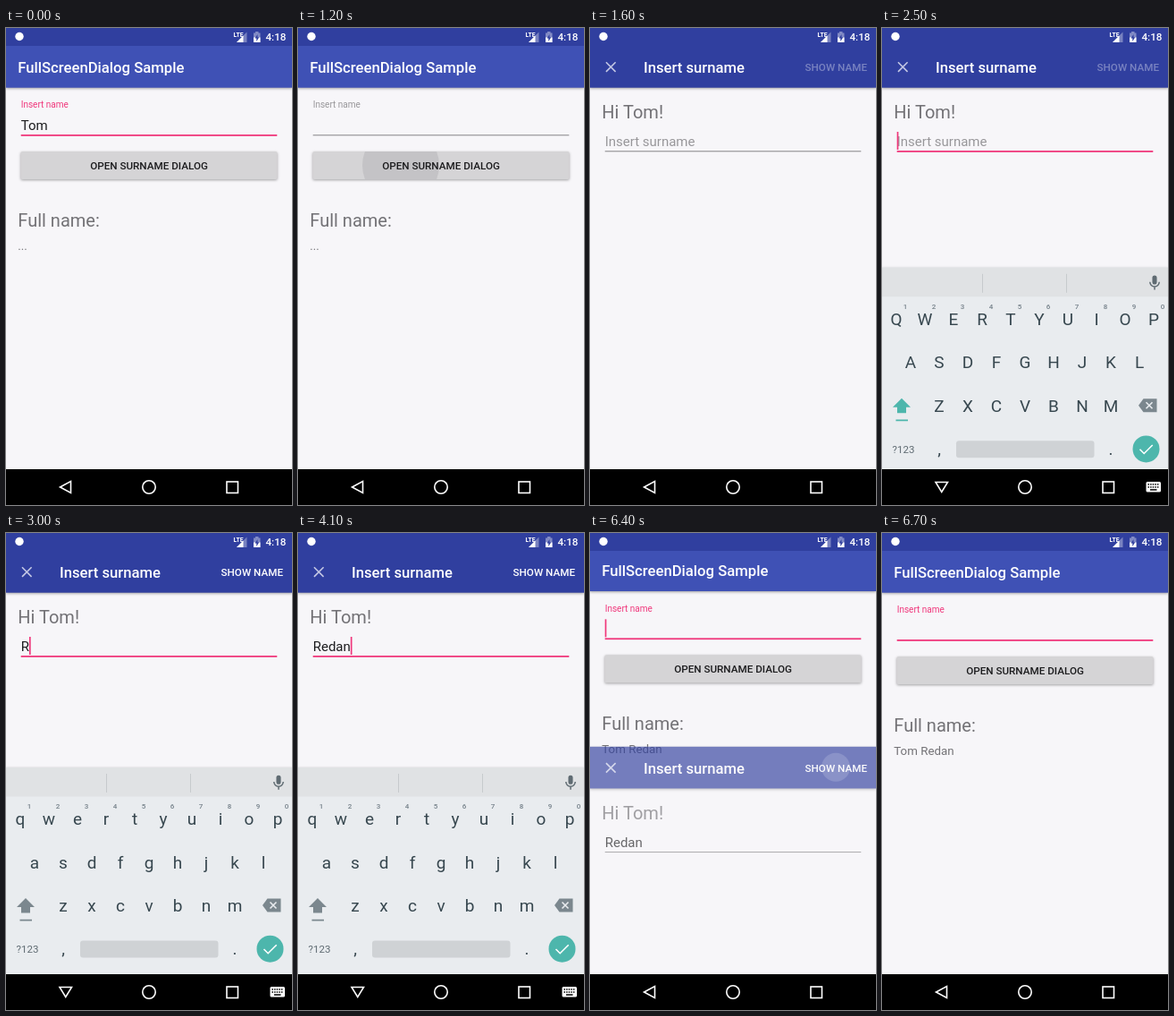
Write an HTML page that moves like this. It is 320 px wide and 533 px high and loops after 6.8 s.

```html
<!DOCTYPE html>
<html lang="en">
<head>
<meta charset="utf-8">
<title>FullScreenDialog Sample</title>
<style>
  html, body { margin: 0; height: 100%; overflow: hidden; background: #f7f6f9; }
  svg { display: block; width: 100%; height: 100%; font: 15px Roboto, sans-serif; }
  .title { font-size: 16.67px; font-weight: 500; fill: #fff; }
  .caps { font-size: 11.67px; font-weight: 500; }
  .head { font-size: 20px; fill: #737276; }
  .body { font-size: 13.33px; fill: #737276; }
  .label { font-size: 10px; }
  .field { fill: #1d1d1f; }
  .shadow { filter: drop-shadow(0 1px 1.5px rgba(0, 0, 0, .35)); }
  .line { fill: none; stroke-width: 1.6; }
  .key { font-size: 19px; fill: #37474f; text-anchor: middle; }
  .num { font-size: 8px; font-weight: 500; fill: #75818a; text-anchor: middle; }
</style>
</head>
<body>
<svg viewBox="0 0 320 533">
  <clipPath id="btnClip"><rect x="16.5" y="138" width="287" height="31" rx="1.7"/></clipPath>
  <rect width="320" height="533" fill="#f7f6f9"/>

  <g id="main">
    <rect class="shadow" y="10" width="320" height="56.7" fill="#3f51b5"/>
    <text class="title" x="13.3" y="50">FullScreenDialog Sample</text>
    <text class="label" id="nameLabel" x="16.7" y="89.3">Insert name</text>
    <text class="field" id="name" x="16.7" y="114"></text>
    <rect id="nameLine" x="16.7" width="286.6"/>
    <rect id="nameCaret" y="98" width="1.7" height="20" fill="#f0387c"/>
    <rect class="shadow" x="16.5" y="138" width="287" height="31" rx="1.7" fill="#d5d4d6"/>
    <circle id="btnRipple" cx="115" cy="153.5" fill="#c4c3c6" clip-path="url(#btnClip)"/>
    <text class="caps" x="160" y="158" text-anchor="middle" fill="#1c1c1e">OPEN SURNAME DIALOG</text>
    <text class="head" x="13.3" y="221.5">Full name:</text>
    <text class="body" id="full" x="13.3" y="248"></text>
  </g>

  <g id="dialog">
    <rect y="20" width="320" height="513" fill="#f7f6f9"/>
    <rect class="shadow" y="20" width="320" height="46.7" fill="#303f9f"/>
    <path class="line" stroke="#c3c7e4" d="M18 38.3l10.6 10.6M28.6 38.3l-10.6 10.6"/>
    <text class="title" x="60" y="50">Insert surname</text>
    <circle id="actRipple" cx="275" cy="43" fill="#fff" opacity=".16"/>
    <text class="caps" id="action" x="310" y="48" text-anchor="end" fill="#fff">SHOW NAME</text>
    <text class="head" id="hi" x="13.3" y="101"></text>
    <text id="surname" x="16.7" y="132"></text>
    <rect id="surLine" x="16.7" width="286.6"/>
    <rect id="surCaret" y="116" width="1.7" height="20" fill="#f0387c"/>
  </g>

  <g id="keyboard">
    <rect class="shadow" y="262" width="320" height="300" fill="#e9ecef"/>
    <rect y="262" width="320" height="32.5" fill="#e0e2e4"/>
    <path stroke="#c6cacd" d="M112.5 269v21M206.5 269v21"/>
    <g fill="none" stroke="#5f6b72" stroke-width="1.5">
      <path d="M299.8 278a5.2 5.2 0 0 0 10.4 0M305 283.3v3.4"/>
      <rect x="303.2" y="271.5" width="3.6" height="8.5" rx="1.8" fill="#5f6b72"/>
    </g>
    <g id="keys"></g>
    <path id="shift" d="M22 408l10 10h-5v6.5h-10v-6.5h-5zM15.5 431.7h13.5v1.8h-13.5z"/>
    <path fill="#7b878e" d="M287 416l5.5-7.5h15v15h-15z"/>
    <path stroke="#e9ecef" stroke-width="1.6" d="M295.5 412.5l7 7M302.5 412.5l-7 7"/>
    <text x="24" y="469" font-size="11.5" fill="#5f6b72" text-anchor="middle">?123</text>
    <text class="key" x="64" y="471">,</text>
    <rect x="83" y="455.5" width="154.5" height="19" rx="3" fill="#cfd2d5"/>
    <text class="key" x="256" y="471">.</text>
    <circle cx="295.5" cy="464.7" r="15" fill="#4db6ac"/>
    <path class="line" stroke="#fff" d="M288.5 465l4.7 4.7 9.5-9.5"/>
  </g>

  <rect y="493" width="320" height="40"/>
  <g class="line" stroke="#fff">
    <path id="back"/>
    <circle cx="160" cy="513" r="7.2"/>
    <rect x="247" y="507" width="12.5" height="12.5"/>
  </g>
  <g id="imeIcon" stroke="#000" stroke-width="1.5">
    <rect x="295.5" y="507" width="16.5" height="11.5" rx="1.5" fill="#fff" stroke="none"/>
    <path stroke-dasharray="1.5 1.1" d="M297.5 510h13M297.5 513h13"/>
    <path d="M300 516h7.5"/>
  </g>

  <rect width="320" height="20" fill="#303f9f"/>
  <g fill="#fff">
    <circle cx="15" cy="9.5" r="4.7"/>
    <text x="254.5" y="9.8" font-size="6.8" font-weight="700">LTE</text>
    <path opacity=".35" d="M258 16l11.5-11.5V16z"/>
    <path d="M258 16l7.5-7.5V16z"/>
    <path opacity=".4" d="M277 5.5h2v-1.5h3.5v1.5h2V16h-7.5z"/>
    <path d="M277 10.5h7.5V16h-7.5z"/>
    <path fill="#303f9f" d="M281.5 7l-3 4.5h1.8V15l3-4.7h-1.8z"/>
    <text x="313.5" y="14.3" font-size="11.7" font-weight="500" text-anchor="end">4:18</text>
  </g>
</svg>
<script>
const FIRST = "Tom", LAST = "Redan", PINK = "#f0387c", GREY = "#858487", LOOP = 6800, STEP = 100;
const el = {};
document.querySelectorAll("[id]").forEach(e => el[e.id] = e);

const set = (e, attrs) => { for (const k in attrs) e.setAttribute(k, attrs[k]); };
const write = (e, s) => { if (e.textContent !== s) e.textContent = s; };
const show = (e, on) => e.setAttribute("display", on ? "inline" : "none");
const clamp = x => x < 0 ? 0 : x > 1 ? 1 : x;
const smooth = x => (x = clamp(x), x * x * (3 - 2 * x));
const within = (t, a, b) => t >= a && t < b;

function addText(cls, x, y, s) {
  const e = document.createElementNS("http://www.w3.org/2000/svg", "text");
  set(e, { class: cls, x, y });
  e.textContent = s;
  el.keys.append(e);
  return e;
}
const letters = [];
[["qwertyuiop", 16, 326], ["asdfghjkl", 32, 374.5], ["zxcvbnm", 64, 423]].forEach(([row, x, y], r) =>
  [...row].forEach((ch, i) => {
    letters.push([addText("key", x + 32 * i, y, ch), ch]);
    if (!r) addText("num", 26 + 32 * i, 308.3, (i + 1) % 10);
  }));

function underline(e, y, focused) {
  set(e, focused ? { y: y - .3, height: 1.8, fill: PINK } : { y, height: 1, fill: GREY });
}
function caret(e, field, on) {
  set(e, { x: 16.7 + (field ? field.getComputedTextLength() : 0) });
  show(e, on);
}

function drawMain(t) {
  const focused = t < 1100 || t >= 6200;
  write(el.name, t < 1100 ? FIRST : "");
  write(el.full, t < 6200 ? "..." : FIRST + " " + LAST);
  set(el.nameLabel, { fill: focused ? PINK : "#98979a" });
  underline(el.nameLine, 119.3, focused);
  caret(el.nameCaret, t < 1100 ? el.name : null, within(t, 100, 600) || within(t, 6200, 6700));
  set(el.btnRipple, { r: within(t, 1000, 1600) ? 4 + (t - 1000) * .195 : 0 });
  const lift = t < 6200 ? 0 : 6 * (1 - clamp((t - 6210) / 400)) ** 2;
  set(el.main, { transform: `translate(0 ${-lift})` });
}

function drawDialog(t) {
  const away = t < 1600 ? 1 - smooth((t - 1200) / 400) : smooth((t - 6210) / 400);
  show(el.dialog, within(t, 1300, 6700));
  set(el.dialog, { transform: `translate(0 ${473 * away})`, opacity: 1 - .75 * away });

  const typed = LAST.slice(0, Math.floor(clamp((t - 2900) / 500) * 5 + .01));
  const focused = within(t, 2300, 6300);
  const blink = [[2800, 3000], [3900, 4100], [4600, 5100], [5700, 6200]].some(([a, b]) => within(t, a, b));
  write(el.hi, `Hi ${FIRST}!`);
  write(el.surname, typed || "Insert surname");
  set(el.surname, { fill: typed ? "#1d1d1f" : "#98979a" });
  set(el.action, { opacity: typed ? 1 : .35 });
  underline(el.surLine, 137.3, focused);
  caret(el.surCaret, typed ? el.surname : null, focused && !blink);
  set(el.actRipple, { r: t >= 6200 ? 8 + (t - 6200) * .04 : 0 });
}

function drawKeyboard(t) {
  const open = t < 5000 ? clamp((t - 2300) / 400) : 1 - clamp((t - 5000) / 400);
  const upper = t < 3000, up = within(t, 2400, 5200);
  show(el.keyboard, open > 0);
  set(el.keyboard, { opacity: clamp(open * 2), transform: `translate(0 ${23 * (1 - open) ** 2})` });
  letters.forEach(([e, ch]) => write(e, upper ? ch.toUpperCase() : ch));
  set(el.shift, { fill: upper ? "#4db6ac" : "#7b878e" });
  show(el.imeIcon, up);
  set(el.back, { d: up ? "M60 507.5h13.5l-6.75 11z" : "M72.5 506.5v13l-12-6.5z" });
}

function frame(now) {
  const t = Math.floor(now % LOOP / STEP) * STEP;
  drawMain(t);
  drawDialog(t);
  drawKeyboard(t);
  requestAnimationFrame(frame);
}
requestAnimationFrame(frame);
</script>
</body>
</html>
```
